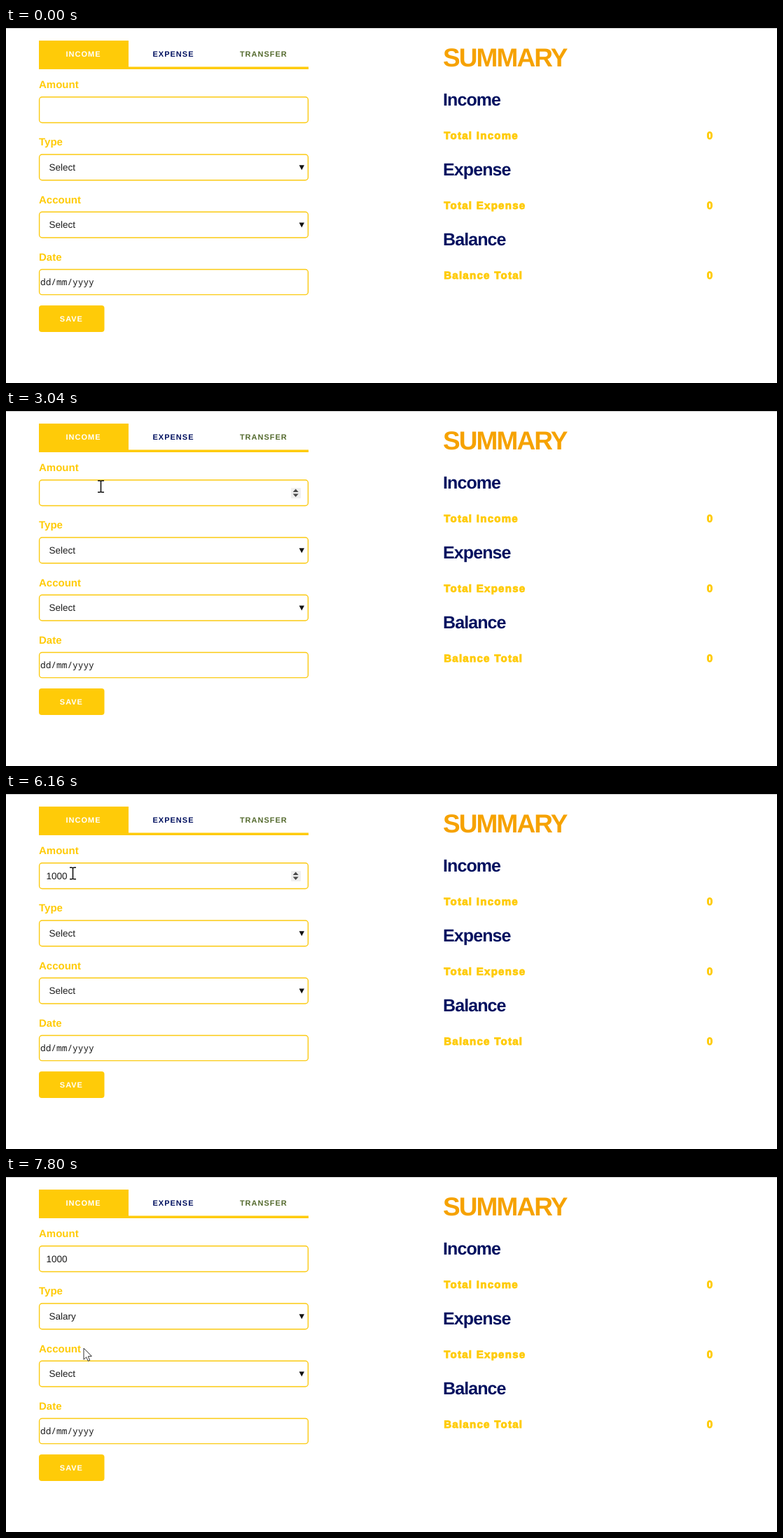
These frames come from a looping animation (1101x508 px, 8000 ms). An HTML page:

```html
<!DOCTYPE html>
<html lang="en">
<head>
<meta charset="utf-8">
<title>Budget form</title>
<style>
  html, body { margin: 0; width: 100%; height: 100%; overflow: hidden; background: #fff; }
  svg { display: block; font-family: "Liberation Sans", Arial, sans-serif; text-rendering: geometricPrecision; }
  .tab { font: bold 11px "Liberation Sans", Arial, sans-serif; letter-spacing: 1px; }
  .label { font-size: 15px; font-weight: bold; fill: #ffcb08; }
  .value { font-size: 13.5px; fill: #1c1c1c; }
  .date { font: 12.8px "Noto Sans Mono", monospace; fill: #1c1c1c; }
  .title { font-size: 37px; font-weight: bold; letter-spacing: -1.9px; fill: #f6a200; }
  .head { font-size: 25px; font-weight: bold; letter-spacing: -.9px; fill: #00105f; }
  .total { font-size: 15px; font-weight: bold; letter-spacing: 1.28px; fill: #ffcb08; stroke: #ffcb08; stroke-width: .9; }
  .field { fill: #fff; stroke: #fbca12; stroke-width: 1.4; }
</style>
</head>
<body>
<svg id="stage" width="1101" height="508" viewBox="0 0 1101 508">
  <rect width="1101" height="508" fill="#fff"/>
  <rect width="1101" height="1" fill="#cbcbcb"/>
  <g id="page">
    <path d="M47 18H175V55.6H432V59H47Z" fill="#ffcb08"/>
    <rect x="47" y="397" width="93.5" height="38" rx="4" fill="#ffcb08"/>
  </g>
  <g id="spinner">
    <rect x="407" y="110" width="14" height="15" rx="1" fill="#efefef"/>
    <path d="M409.7 116 L413.7 111.6 L417.7 116Z M409.7 118.6 L413.7 123 L417.7 118.6Z" fill="#4a4a4a"/>
  </g>
  <rect id="caret" y="110" width="1" height="14.5" fill="#222"/>
  <g id="list">
    <rect x="47.5" y="218.5" width="384" height="84.5" fill="#fff" stroke="#82a9dc"/>
    <rect id="mark" x="47.5" width="384" height="16.8" fill="#1e90ff"/>
  </g>
  <circle id="click" r="12" fill="#ffee00" opacity=".5"/>
  <path id="arrow" d="M0 0V16.2L3.7 12.7L6.2 18.3L8.7 17.2L6.3 11.8L11.3 11.4Z"
        fill="#fff" stroke="#333" stroke-width="1" stroke-linejoin="round"/>
  <path id="beam" d="M-4.5 -8.3H-1.2L0 -7.4L1.2 -8.3H4.5M0 -7.6V7.6M-4.5 8.3H-1.2L0 7.4L1.2 8.3H4.5"
        fill="none" stroke="#111" stroke-width="1.6"/>
</svg>
<script>
const LOOP = 8000;
const $ = id => document.getElementById(id);

function add(parent, tag, attrs, content = '') {
  const el = document.createElementNS('http://www.w3.org/2000/svg', tag);
  for (const key in attrs) el.setAttribute(key, attrs[key]);
  el.textContent = content;
  parent.appendChild(el);
  return el;
}
const page = $('page');
const write = (cls, x, y, content, extra = {}, parent = page) =>
  add(parent, 'text', { class: cls, x, y, ...extra }, content);

write('tab', 85.5, 41, 'INCOME', { fill: '#fff' });
write('tab', 209.5, 41, 'EXPENSE', { fill: '#00105f' });
write('tab', 333.9, 41, 'TRANSFER', { fill: '#556b2f' });
write('tab', 76.8, 420, 'SAVE', { fill: '#fff' });

['Amount', 'Type', 'Account', 'Date'].forEach((name, i) => {
  const y = 82.25 * i;
  write('label', 47, 86 + y, name);
  add(page, 'rect', { class: 'field', x: 47.6, y: 98.7 + y, width: 383.8, height: i === 3 ? 36.2 : 36.8, rx: 4 });
  if (i === 1 || i === 2)
    add(page, 'path', { d: `M418.6 ${113.9 + y}h7.4l-3.7 7z`, fill: '#111' });
});
const amount = write('value', 57.6, 122, '');
const type = write('value', 61.4, 204, 'Select');
write('value', 61.4, 286.3, 'Select');
write('date', 49, 368, 'dd/mm/yyyy');

write('title', 624, 55, 'SUMMARY');
[['Income', 'Total Income'], ['Expense', 'Total Expense'], ['Balance', 'Balance Total']].forEach(([head, total], i) => {
  write('head', 624, 111 + 100.2 * i, head);
  write('total', 625.2, 159 + 100.2 * i, total);
  write('total', 1000.8, 159 + 100.2 * i, '0', { 'stroke-width': 1.1 });
});

const ROW = 16.75;
const options = ['Select', 'Salary', 'Bonus', 'Interest', 'Refund'].map((name, i) =>
  write('value', 61.4, 231 + ROW * i, name, {}, $('list')));

// time, x, y, number of steps taken to get there, ease-out power
const moves = [
  [120, 910, 490, 1],
  [640, 130, 178, 7, 1.7],
  [710, 124, 189, 1],
  [2030, 128, 174, 1],
  [2810, 137, 130, 10],
  [3040, 135.5, 108, 3],
  [3200, 122, 91, 2],
  [3580, 95.5, 113.5, 5],
  [6450, 97, 122, 1],
  [6870, 123, 204, 5],
  [7240, 122, 209, 1],
  [7430, 117.5, 227, 2],
  [7570, 111, 245, 2]
];
const keys = [4820, 5130, 5370, 5610];
const carets = [[3800, 4350], [4730, 6160], [6690, 6950]];
const clicks = [[3730, 3880], [6790, 6950], [7710, 7800]];
const OPEN = 6950, CLOSE = 7800, FOCUS = 3730;

const within = (t, spans) => spans.some(([a, b]) => t >= a && t < b);
const show = (id, on) => $(id).setAttribute('visibility', on ? 'visible' : 'hidden');

function pointer(t) {
  const i = moves.findIndex(m => t < m[0]);
  if (i === 0) return null;
  if (i < 0) return moves[moves.length - 1].slice(1, 3);
  const [t0, x0, y0] = moves[i - 1];
  const [t1, x1, y1, steps, power = 1] = moves[i];
  const part = Math.floor((t - t0) / (t1 - t0) * steps + 1e-6) / steps;
  const k = 1 - (1 - part) ** power;
  return [x0 + (x1 - x0) * k, y0 + (y1 - y0) * k];
}

function draw(t) {
  const pos = pointer(t);
  const inField = !!pos && pos[1] > 98 && pos[1] < 136;
  const open = t >= OPEN && t < CLOSE;
  const typed = keys.filter(k => t >= k).length;

  amount.textContent = '1000'.slice(0, typed);
  type.textContent = t >= CLOSE ? 'Salary' : 'Select';
  $('caret').setAttribute('x', 57.7 + 7.5 * typed);
  show('caret', within(t, carets));
  show('spinner', inField || (t >= FOCUS && t < OPEN));
  show('list', open);

  const picked = pos && pos[1] > 235 ? 1 : 0;
  $('mark').setAttribute('y', 218.4 + ROW * picked);
  options.forEach((o, i) => o.style.fill = i === picked ? '#fff' : '');

  show('arrow', pos && !inField);
  show('beam', inField);
  show('click', within(t, clicks));
  if (pos) for (const id of ['arrow', 'beam', 'click'])
    $(id).setAttribute('transform', `translate(${pos[0]} ${pos[1]})`);
}

const start = performance.now();
function tick() {
  draw((performance.now() - start) % LOOP);
  requestAnimationFrame(tick);
}
tick();
</script>
</body>
</html>
```
